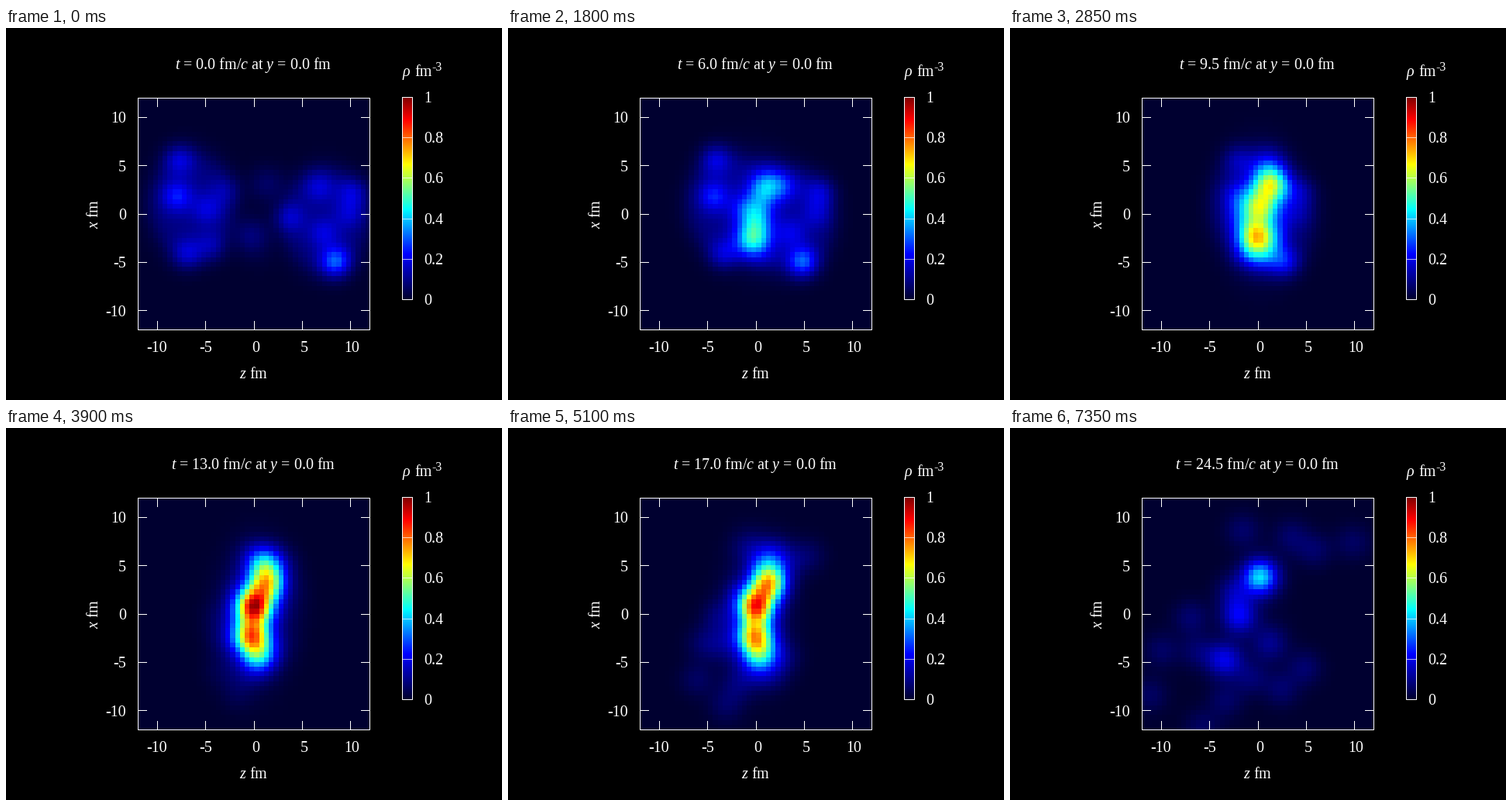
A matplotlib script that plays this animation: 640 by 480 pixels, repeating every 7.5 s.

```python
import numpy as np
import matplotlib.pyplot as plt
from matplotlib.animation import FuncAnimation
from matplotlib.colors import LinearSegmentedColormap

FRAMES, INTERVAL, DT = 50, 150, 0.5
T_END = (FRAMES - 1) * DT
LEFT, RIGHT, TOP, BOTTOM = 170.5, 469.5, 90.5, 389.5
BAR = (511.5, 524.5, 89.5, 350.5)
UNIT = (RIGHT - LEFT) / 24
SPEED = 0.6

plt.rcParams.update({
    "font.family": "Liberation Serif",
    "mathtext.fontset": "custom",
    "mathtext.rm": "Liberation Serif",
    "mathtext.it": "Liberation Serif:italic",
})

# Each nucleus: direction, centre (z, x), dense clumps (z, x, density).
NUCLEI = [
    (1, (-6.5, 0.9), [(-7.8, 5.6, .13), (-8, 1.8, .16), (-4.9, .5, .1),
                      (-7, -4.2, .12), (-4.5, -3.4, .08), (-3, 2.4, .06)]),
    (-1, (7.3, -0.7), [(6.7, 2.8, .1), (3.6, -.4, .1), (10.2, 2.2, .11),
                       (8.4, -5, .24), (7.2, -2, .1), (9.8, 0, .08)]),
]
# Compressed cores: start, end, density, time of the maximum, duration.
CORES = [
    ((1.1, 5.2), (3.4, 6.2), .28, 14, 3.5),
    ((1.3, 3.1), (.2, 3.8), .60, 17.5, 8),
    ((0, .7), (-2, 1), .80, 14.8, 4),
    ((-.3, -2.3), (-2, -.4), .55, 14, 7),
    ((.4, -4.2), (-3.5, -4.8), .30, 18, 7),
]
# Where the fragments have flown to at the end.
FRAGMENTS = [
    (9.8, 7.4), (5.8, 6.6), (3.4, 8), (-1.6, 8.6), (-2.5, 2.3), (-7, -.4),
    (-6.2, -3.9), (-10, -3.8), (-11.2, -8.4), (-5.8, -11.7), (-3.4, -9),
    (-.8, -6.6), (2.4, -7.8), (4.8, -5.6), (1.2, -3.1),
]

cells = np.arange(-11.75, 12, 0.5)
Z, X = np.meshgrid(cells, cells)


def smooth(u):
    u = np.clip(u, 0, 1)
    return u * u * (3 - 2 * u)


def pulse(t, middle, width):
    return np.exp(-((t - middle) / width) ** 2 / 2)


def blob(z, x, size_z=1.25, size_x=None):
    return pulse(Z, z, size_z) * pulse(X, x, size_x or size_z)


def nuclei(t):
    total = 0
    for side, (z, x), clumps in NUCLEI:
        shift = side * SPEED * t
        r = np.hypot((Z - z - shift) / 0.8, X - x)
        total = total + 0.09 / (1 + np.exp((r - 5.4) / 0.7))
        for cz, cx, peak in clumps:
            total = total + peak * blob(cz + shift, cx, 1.1)
    return total * (1 - smooth((t - 6) / 9))


def fireball(t):
    total = 0.12 * pulse(t, 14, 5) * blob(0, 0, 2.2, 4)
    u = smooth((t - 17) / (T_END - 17))
    for (z0, x0), (z1, x1), peak, middle, width in CORES:
        total = total + peak * pulse(t, middle, width) * blob(
            z0 + (z1 - z0) * u, x0 + (x1 - x0) * u)
    return total


def fragments(t):
    left = T_END - t
    total = 0
    for z, x in FRAGMENTS:
        peak = 0.05 + 0.1 * np.exp(-np.hypot(z, x) / 4)
        total = total + peak * blob(z * (1 - 0.06 * left),
                                    x * (1 - 0.025 * left))
    return total * smooth((t - 9) / 8)


def density(t):
    return nuclei(t) + fireball(t) + fragments(t)


palette = LinearSegmentedColormap.from_list("density", [
    (0, "#000030"), (2 / 9, "#0000ff"), (4 / 9, "#00ffff"),
    (6 / 9, "#ffff00"), (8 / 9, "#ff0000"), (1, "#800000")], N=512)

fig = plt.figure(figsize=(6.4, 4.8), dpi=100, facecolor="black")
ax = fig.add_axes([0, 0, 1, 1])
ax.axis("off")


def line(xs, ys, **style):
    # Centre the stroke on whole pixels.
    ax.plot(np.floor(xs) + 0.5, np.floor(ys) + 0.5, color="white", lw=0.72,
            snap=False, solid_capstyle="projecting",
            solid_joinstyle="miter", **style)


def box(x0, x1, y0, y1):
    line([x0, x1, x1, x0, x0], [y0, y0, y1, y1, y0])


def label(x, y, s, size=20, ha="center", **style):
    return ax.text(x, y, s, color="white", fontsize=size * 0.72, ha=ha,
                   va="baseline", **style)


def picture(data, extent):
    return ax.imshow(data, cmap=palette, vmin=0, vmax=1, origin="lower",
                     extent=extent, aspect="auto", interpolation="nearest")


field = picture(density(0), (LEFT, RIGHT, BOTTOM, TOP))
picture(np.linspace(0, 1, 261)[:, None], (BAR[0], BAR[1], BAR[3], BAR[2]))

box(LEFT, RIGHT, TOP, BOTTOM)
for v in range(-10, 11, 5):
    px, py = 320 + v * UNIT, 240 - v * UNIT
    for edge, inner in ((TOP, TOP + 11), (BOTTOM, BOTTOM - 11)):
        line([px, px], [edge, inner])
    for edge, inner in ((LEFT, LEFT + 11), (RIGHT, RIGHT - 11)):
        line([edge, inner], [py, py])
    label(px + (2 if v >= 0 else -0.5), 418, str(v))
    label(155, py + 7, str(v), ha="right")

box(*BAR)
for i in range(6):
    y = BAR[3] - i / 5 * (BAR[3] - BAR[2])
    if 0 < i < 5:
        line(BAR[:2], [y, y], alpha=0.7)
    label(539.5, y + 6.5, f"{i / 5:g}", ha="left")

title = label(319.2, 53, "")
label(319, 452, "$z$ fm")
label(119, 240, "$x$ fm", rotation=90, rotation_mode="anchor")
label(512, 62, "ρ", ha="left", style="italic")
label(527, 62, "fm", ha="left")
label(549.5, 55, "-3", size=16, ha="left")

ax.set_xlim(0, 640)
ax.set_ylim(480, 0)


def update(i):
    t = i * DT
    field.set_data(density(t))
    title.set_text(f"$t$ = {t:.1f} fm/$c$ at $y$ = 0.0 fm")
    return field, title


anim = FuncAnimation(fig, update, frames=FRAMES, interval=INTERVAL,
                     repeat=True, repeat_delay=0)
plt.show()
```
